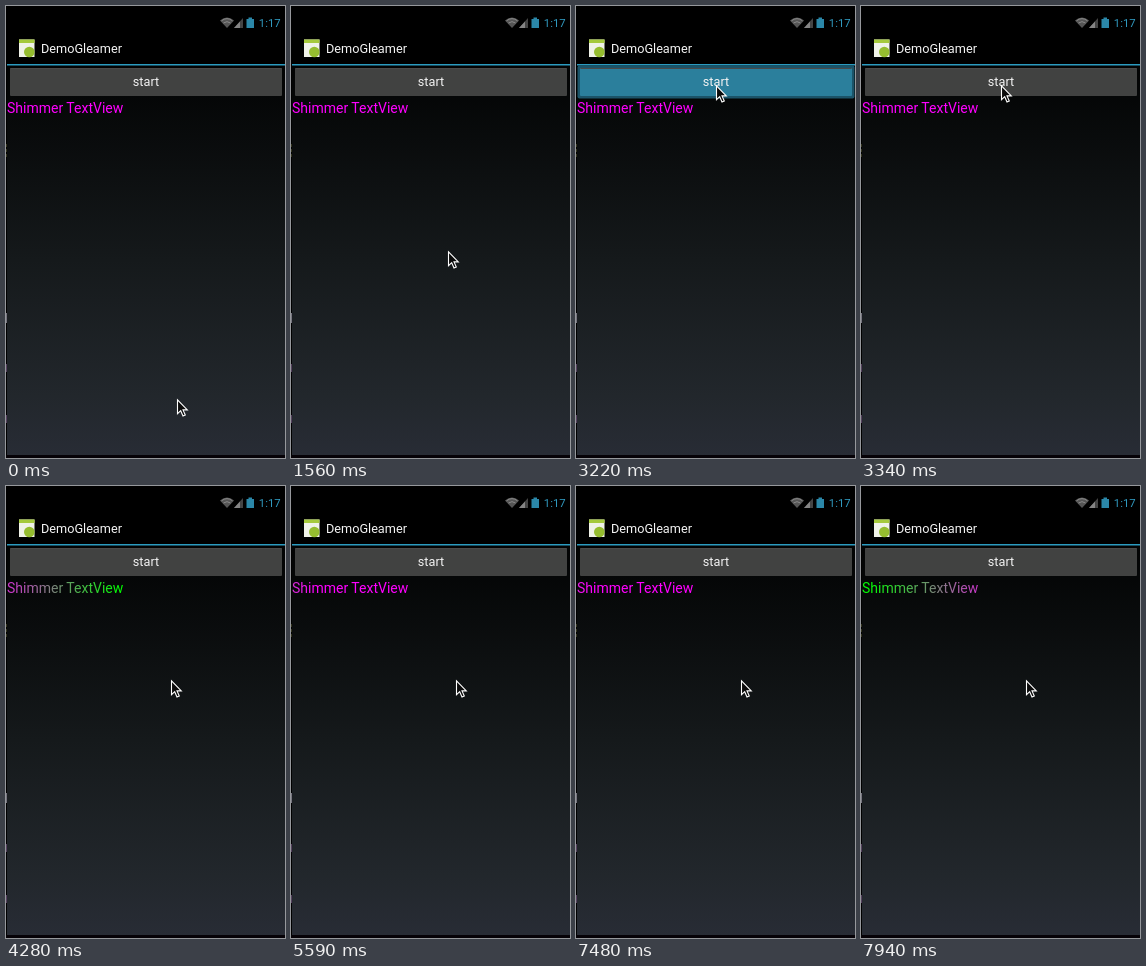
An HTML page for the animation above (8000 ms loop, 279x452 px).

```html
<!DOCTYPE html>
<html lang="en">
<head>
<meta charset="utf-8">
<title>Shimmer demo</title>
<style>
  html, body { margin: 0; width: 100%; height: 100%; overflow: hidden; background: #000; }
  svg { display: block; width: 100%; height: 100%; }
  text { font-family: Roboto, "Noto Sans", sans-serif; }
</style>
</head>
<body>
<svg viewBox="0 0 279 452">
  <defs>
    <linearGradient id="backdrop" x2="0" y2="1">
      <stop stop-color="#020303"/>
      <stop offset=".5" stop-color="#15191b"/>
      <stop offset=".85" stop-color="#22272c"/>
      <stop offset="1" stop-color="#282c35"/>
    </linearGradient>
    <linearGradient id="shimmer" gradientUnits="userSpaceOnUse" y1="0" y2="0">
      <stop stop-color="#f0f"/>
      <stop offset=".5" stop-color="#0f0"/>
      <stop offset="1" stop-color="#f0f"/>
    </linearGradient>
  </defs>

  <rect width="279" height="452"/>
  <rect x="1" y="59" width="278" height="390" fill="url(#backdrop)"/>
  <rect y="449" width="279" height="3" fill="#060207"/>
  <g fill="#55405e">
    <path d="M.5 138V151" stroke="#34351f" stroke-dasharray="3 2"/>
    <rect y="307" width="1" height="10" fill="#777580"/>
    <rect y="358" width="1" height="8"/>
    <rect y="409" width="1" height="8"/>
  </g>

  <!-- Status bar -->
  <path d="M214 14.5Q221 8.5 228 14.5L221 22Z" fill="#555"/>
  <path d="M215.5 14.8Q221 10.5 226.5 14.8M217.5 17Q221 14.3 224.5 17" fill="none" stroke="#8a8a8a"/>
  <path d="M228 22L237 12V22Z" fill="#444"/>
  <path d="M228 22L234 15.5V22Z" fill="#858585"/>
  <path d="M240.5 13H242.5V11.5H246V13H248V22H240.5Z" fill="#2b87a8"/>
  <text x="252.8" y="21" font-size="11.3" fill="#3099bf">1:17</text>

  <!-- Title bar -->
  <path d="M13 33.5H28.5V51H13Z" fill="#f0f2e8"/>
  <path d="M13 33.5H28.5V37H13Z" fill="#a5c93c"/>
  <circle cx="23.3" cy="46" r="5.3" fill="#96bd30"/>
  <text x="35" y="47" font-size="12.7" fill="#f3f3f3">DemoGleamer</text>
  <rect x="1" y="58" width="278" height="1.5" fill="#2b9abf"/>

  <!-- Button -->
  <rect id="glow" x="1.5" y="59.5" width="277" height="33" rx="2" fill="#1b5469"/>
  <rect id="button" x="4" y="62" width="272" height="28" rx="1"/>
  <path d="M4.5 62.5H275.5" stroke="#4a4a4a"/>
  <text x="140" y="80" font-size="12.7" text-anchor="middle" fill="#f3f3f3">start</text>

  <text x="1" y="107.4" font-size="14" fill="url(#shimmer)">Shimmer TextView</text>

  <path id="cursor" d="M.5 .8V14.7L3.7 11.7L6 17L8.3 16L6 10.9H10.3Z" fill="#0b0b0b" stroke="#fff" stroke-width="1.1"/>
</svg>
<script>
const LOOP = 8000;
const STEP = 118.3;          // screen refresh interval
const STEP_ORIGIN = 1440;
const WIDTH = 279;
const SWEEP_START = 3355, SWEEP_PERIOD = 1960;

// [time, x, y] of the pointer tip
const POINTER = [
  [0, 171, 393], [1322, 171, 393], [1440, 166, 340], [1560, 157, 245], [1680, 152, 190],
  [1795, 152, 190], [2500, 140, 79], [3460, 140, 79], [4170, 165, 194], [LOOP, 165, 194]
];

const byId = id => document.getElementById(id);
const gradient = byId("shimmer"), glow = byId("glow"), button = byId("button"), cursor = byId("cursor");
const ease = u => (1 - Math.cos(Math.PI * u)) / 2;

function pointerAt(time) {
  const next = Math.max(1, POINTER.findIndex(key => key[0] > time));
  const [t0, x0, y0] = POINTER[next - 1], [t1, x1, y1] = POINTER[next];
  const u = ease(Math.min(1, (time - t0) / (t1 - t0)));
  return [x0 + (x1 - x0) * u, y0 + (y1 - y0) * u].map(Math.round);
}

function draw(now) {
  const time = now % LOOP;
  const step = Math.floor((time - STEP_ORIGIN + 8) / STEP);
  const shown = Math.max(0, STEP_ORIGIN + step * STEP);

  cursor.setAttribute("transform", `translate(${pointerAt(shown)})`);

  const pressed = time >= 3220 && time < 3340;
  glow.setAttribute("visibility", pressed ? "visible" : "hidden");
  button.setAttribute("fill", pressed ? "#2b7f9c" : "#414241");

  const sweep = Math.max(0, shown - SWEEP_START) % SWEEP_PERIOD / SWEEP_PERIOD;
  const right = 2 * WIDTH * ease(sweep);
  gradient.setAttribute("x1", right - WIDTH);
  gradient.setAttribute("x2", right);

  requestAnimationFrame(draw);
}
requestAnimationFrame(draw);
</script>
</body>
</html>
```
